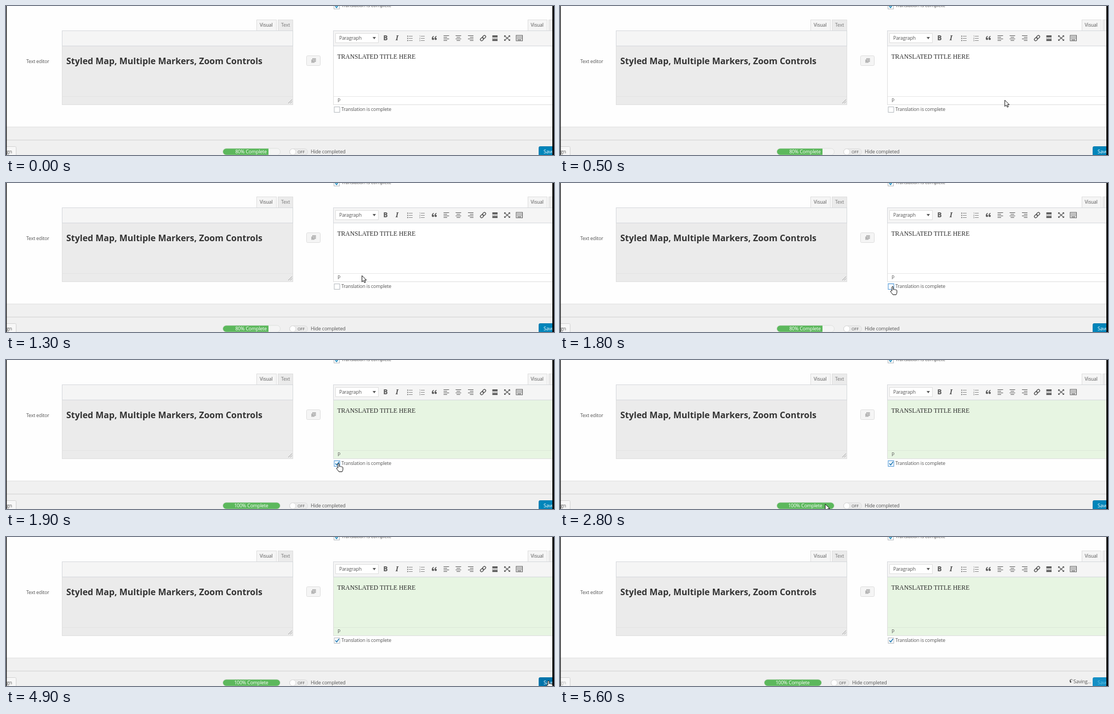
An HTML page that plays this animation: 1000 px wide and 274 px high, repeating every 5700 ms.

```html
<!DOCTYPE html>
<html lang="en">
<head>
<meta charset="utf-8">
<title>Translation editor</title>
<style>
  html, body { margin: 0; width: 100%; height: 100%; overflow: hidden; background: #fefefe; }
  svg { display: block; width: 100vw; height: 100vh; }
  text { font: 8.75px "Open Sans", "Noto Sans", sans-serif; letter-spacing: -.016em; fill: #555; }
  .title { font-size: 15.95px; font-weight: 700; letter-spacing: 0; fill: #333; }
  .serif { font: 11.6px "Liberation Serif", serif; letter-spacing: 0; fill: #2c2c2c; }
  .white { fill: #fff; }
  .edge { stroke: #dedede; }
  .icon { stroke: #595959; stroke-width: 1.1; fill: none; }
  .thin { stroke: #8a8a8a; stroke-width: 1; }
  .solid { fill: #595959; stroke: none; }
  .bold { font-size: 12px; font-weight: 700; fill: #505050; }
  .italic { font: italic 700 12px "Noto Serif", serif; fill: #505050; }
  .cursor { stroke: #111; stroke-width: 1; fill: #fff; stroke-linejoin: round; }
</style>
</head>
<body>
<svg viewBox="0 0 1000 274" preserveAspectRatio="none">
  <rect width="1000" height="274" fill="#fefefe"/>
  <rect y="222" width="1000" height="52" fill="#f0f0f0"/>
  <path d="M0 222.5H1000" stroke="#dfdfdf"/>
  <path d="M0 246.5H1000" stroke="#d3d3d3"/>

  <!-- upper row -->
  <rect x="598.5" y="-5.5" width="10" height="11" fill="#fff" stroke="#b4b9be"/>
  <path d="M600.8 .3l2.5 2.6 4-6" fill="none" stroke="#1e8cbe" stroke-width="1.7"/>
  <text x="612" y="2.3">Translation is complete</text>

  <!-- left editor -->
  <text x="37" y="104.5">Text editor</text>
  <g class="edge">
    <rect x="457.5" y="25.5" width="36" height="20" fill="#f5f5f5"/>
    <rect x="496.5" y="25.5" width="27" height="20" fill="#ebebeb"/>
    <rect x="102.5" y="45.5" width="421" height="136" fill="#ebebeb"/>
    <rect x="102.5" y="45.5" width="421" height="28" fill="#f5f5f5" style="stroke:#d5d8dc"/>
    <path d="M103 166.5H523" style="stroke:#e3e3e3"/>
  </g>
  <text x="463" y="38.3">Visual</text>
  <text x="502" y="38.3" style="fill:#777">Text</text>
  <text class="title" x="110" y="106.8">Styled Map, Multiple Markers, Zoom Controls</text>
  <path d="M515 179l7-7M518.5 179l3.5-3.5" stroke="#999" stroke-width=".9"/>

  <!-- copy button -->
  <rect x="548.5" y="91.5" width="25" height="18" rx="2" fill="#f5f5f5" stroke="#dedede"/>
  <rect x="557" y="98.5" width="6" height="6" fill="#bbb"/>
  <rect x="559.5" y="96.5" width="5.5" height="6" fill="#ccc" stroke="#a5a5a5" stroke-width=".8"/>
  <path d="M561 98.5h3M561 100.5h3" stroke="#a5a5a5" stroke-width=".7"/>

  <!-- right editor -->
  <g class="edge">
    <rect x="952.5" y="25.5" width="35" height="20" fill="#f5f5f5"/>
    <rect x="990.5" y="25.5" width="27" height="20" fill="#ebebeb"/>
    <rect id="pane" x="597.5" y="45.5" width="420" height="136"/>
    <rect x="597.5" y="45.5" width="420" height="28" fill="#f5f5f5" style="stroke:#d5d8dc"/>
    <path id="rule" d="M598 166.5H1000"/>
    <rect x="601.5" y="50.5" width="78" height="17" fill="#fff"/>
  </g>
  <text x="957.5" y="38.3">Visual</text>
  <text x="608" y="62.3">Paragraph</text>
  <path class="solid" d="M669 57h6l-3 4.3z"/>
  <text class="bold" x="688.5" y="63.4">B</text>
  <text class="italic" x="711" y="63.4">I</text>
  <g id="tools" class="icon"></g>
  <text class="serif" x="604.5" y="96.6">TRANSLATED TITLE HERE</text>
  <text x="605" y="177">P</text>

  <rect id="halo" x="598" y="184" width="12" height="12.5" fill="#cfe4f5"/>
  <rect id="box" x="599" y="185.5" width="10" height="10" fill="#fff"/>
  <path id="tick" d="M601 190.3l2.5 2.7 4.2-5.7" fill="none" stroke="#1e78b4" stroke-width="1.6"/>
  <text x="612" y="192.6">Translation is complete</text>

  <!-- footer -->
  <rect x="-9.5" y="258.5" width="28" height="25" rx="2" fill="#f7f7f7" stroke="#d3d3d3"/>
  <text id="back" x="1" y="270.7">gn</text>
  <g id="progress">
    <clipPath id="pill"><rect x="396" y="262.3" width="104" height="11.4" rx="5.7"/></clipPath>
    <rect x="395.5" y="261.8" width="105" height="12.4" rx="6.2" fill="#f4f4f4" stroke="#d8dcd8" stroke-width=".8"/>
    <rect id="bar" x="395" y="262" height="12" fill="#5cb85c" clip-path="url(#pill)"/>
    <text id="percent" class="white" y="271"></text>
    <rect x="517.5" y="262.5" width="33" height="11.5" rx="5.7" fill="#ebebeb" stroke="#d8d8d8" stroke-width=".8"/>
    <circle cx="523.3" cy="268.2" r="5.6" fill="#fff" stroke="#d0d0d0" stroke-width=".8"/>
    <text x="532" y="270.9" style="font-size:7.3px">OFF</text>
    <text x="556" y="271.2" style="font-size:8.9px">Hide completed</text>
  </g>
  <g id="saving">
    <g id="spinner"></g>
    <text x="937" y="268.7">Saving...</text>
  </g>
  <rect id="button" x="972.5" y="258.5" width="40" height="20" rx="2"/>
  <text id="save" x="981" y="271.2">Save</text>

  <g id="pointer" class="cursor">
    <path id="arrow" d="M0 0V11.5L2.7 9 4.5 13 6.5 12.1 4.7 8.3H8.2Z"/>
    <path id="beam" fill="none" stroke-width="1.2" d="M-2.5-5H-.6L0-4.3 .6-5H2.5M0-4.3V4.3M-2.5 5H-.6L0 4.3 .6 5H2.5"/>
    <path id="hand" d="M-1.2 8.5V1Q0-1 1.2 1V6Q2.3 4.7 3.5 6.2 4.7 5.2 5.7 6.7 7.3 6 7.8 7.7V11.5Q7.5 13.5 6.3 15.5H.5Q-1 13-3.5 10.3-4.3 8.3-2.5 8Z"/>
  </g>

  <rect width="1.3" height="274" fill="#111"/>
  <rect x="997" width="3" height="274" fill="#080808"/>
</svg>
<script>
const LOOP = 5700, STEP = 100;
const FOCUS = 1700, CLICK = 1900, SUBMIT = 4800, SAVING = 5000;
const $ = id => document.getElementById(id);
const set = (id, attrs) => Object.entries(attrs).forEach(([k, v]) => $(id).setAttribute(k, v));
const show = (id, on) => set(id, { visibility: on ? "visible" : "hidden" });

// time, x, y of the pointer tip
const track = [
  [100, 988, 262], [700, 750, 142], [900, 733, 131], [1000, 728, 134],
  [1500, 607, 190], [2200, 607, 190], [2800, 484, 265], [3400, 484, 265],
  [3900, 845, 252], [4100, 852, 252], [4500, 990, 264], [5000, 990, 264], [5200, 990, 280]
];

function drawTools() {
  const path = (d, extra = "") => `<path d="${d}" ${extra}/>`;
  // side: 0 left, .5 centre, 1 right
  const align = (cx, side) => path([10, 6.5, 10, 6.5].map((w, i) =>
    `M${cx - 5 + (10 - w) * side} ${54.5 + i * 3}h${w}`).join(""));
  const rows = [55.5, 59.5, 63.5];
  const list = cx => path(rows.map(y => `M${cx - 2} ${y}h7`).join(""), 'class="thin"');
  let out = list(737) + list(759);
  rows.forEach((y, i) => {
    out += `<circle class="solid" cx="733" cy="${y}" r=".9"/>`;
    out += `<text x="754" y="${y + 1.5}" stroke="none" style="font-size:4px">${i + 1}</text>`;
  });
  for (const x of [777, 782]) {
    out += path(`M${x + 3.6} 55Q${x} 55.5 ${x} 60.5A2.1 2.1 0 1 0 ${x + 2} 58.4Q${x + 2} 56.8 ${x + 3.6} 56.4Z`, 'class="solid"');
  }
  out += align(803.5, 0) + align(825.5, .5) + align(848, 1);
  out += `<g transform="translate(870.5 59) rotate(-45)" stroke-width="1.4">
    <rect x="-6" y="-2.3" width="6.5" height="4.6" rx="2.3"/>
    <rect x="-.5" y="-2.3" width="6.5" height="4.6" rx="2.3"/></g>`;
  out += `<rect class="solid" x="887.5" y="54" width="9.5" height="3.5"/>
    <rect class="solid" x="887.5" y="60.8" width="9.5" height="3.5"/>`;
  out += path("M887.5 59.2h9.5", 'stroke-dasharray="1.7 .9"');
  out += path("M910.5 55.5l8 7M918.5 55.5l-8 7");
  out += path("M909 57.5v-3.5h3.5zM920 57.5v-3.5h-3.5zM909 60.5v3.5h3.5zM920 60.5v3.5h-3.5z", 'class="solid"');
  out += `<rect x="931" y="54" width="11.5" height="10" stroke-width="1"/>`;
  out += path("M932.5 56.3h9M932.5 58.3h9M932.5 60.3h9", 'stroke-dasharray="1.3 .6"');
  out += path("M933.5 62.3h6.5");
  $("tools").innerHTML = out;
}

function drawSpinner() {
  let out = "";
  for (let i = 0; i < 7; i++) {
    const a = i * Math.PI / 4;
    out += `<circle cx="${2.6 * Math.cos(a)}" cy="${2.6 * Math.sin(a)}" r="${1.3 - i * .13}" fill="#333" opacity="${1 - i * .14}"/>`;
  }
  $("spinner").innerHTML = out;
}

function pointerAt(t) {
  if (t < track[0][0] || t >= track.at(-1)[0]) return null;
  const i = track.findIndex(key => key[0] > t);
  const [t0, x0, y0] = track[i - 1], [t1, x1, y1] = track[i];
  const p = (t - t0) / (t1 - t0), e = p * p * (3 - 2 * p);
  return [x0 + (x1 - x0) * e, y0 + (y1 - y0) * e];
}

function cursorFor(x, y) {
  if (x > 597 && y > 74 && y < 166) return "beam";
  const onLabel = x > 598 && x < 704 && y > 184 && y < 197;
  return onLabel || (x > 972 && y > 258) ? "hand" : "arrow";
}

function draw(t) {
  const done = t >= CLICK, saving = t >= SAVING;
  const focused = t >= FOCUS && t < SUBMIT;
  const p = pointerAt(t);
  const kind = p && cursorFor(...p);

  set("pane", { fill: done ? "#e7f5e2" : "#fff" });
  $("rule").style.stroke = done ? "#dce9d8" : "#e8e8e8";
  show("halo", focused);
  set("box", { stroke: focused ? "#5b9dd9" : "#b4b9be" });
  show("tick", done);

  set("bar", { width: done ? 106 : 84 });
  $("percent").textContent = done ? "100% Complete" : "80% Complete";
  set("percent", { x: done ? 416.5 : 418.5 });
  set("progress", { transform: `translate(${saving ? -23 : 0})` });

  show("saving", saving);
  set("spinner", { transform: `translate(933.5 264.5) rotate(${(t - 5600) * .45 + 130})` });
  $("back").style.fill = saving ? "#b0b0b0" : "#555";
  const hover = p && p[0] > 972 && p[1] > 258;
  const blue = saving ? "#158fc5" : hover ? "#0073aa" : "#0085ba";
  set("button", { fill: blue, stroke: saving ? blue : "#0077ab" });
  $("save").style.fill = saving ? "#66c6e4" : "#fff";

  for (const id of ["arrow", "beam", "hand"]) show(id, id === kind);
  if (p) set("pointer", { transform: `translate(${p[0]} ${p[1]})` });
}

function tick() {
  draw(Math.floor(performance.now() % LOOP / STEP) * STEP);
  requestAnimationFrame(tick);
}

drawTools();
drawSpinner();
tick();
</script>
</body>
</html>
```
